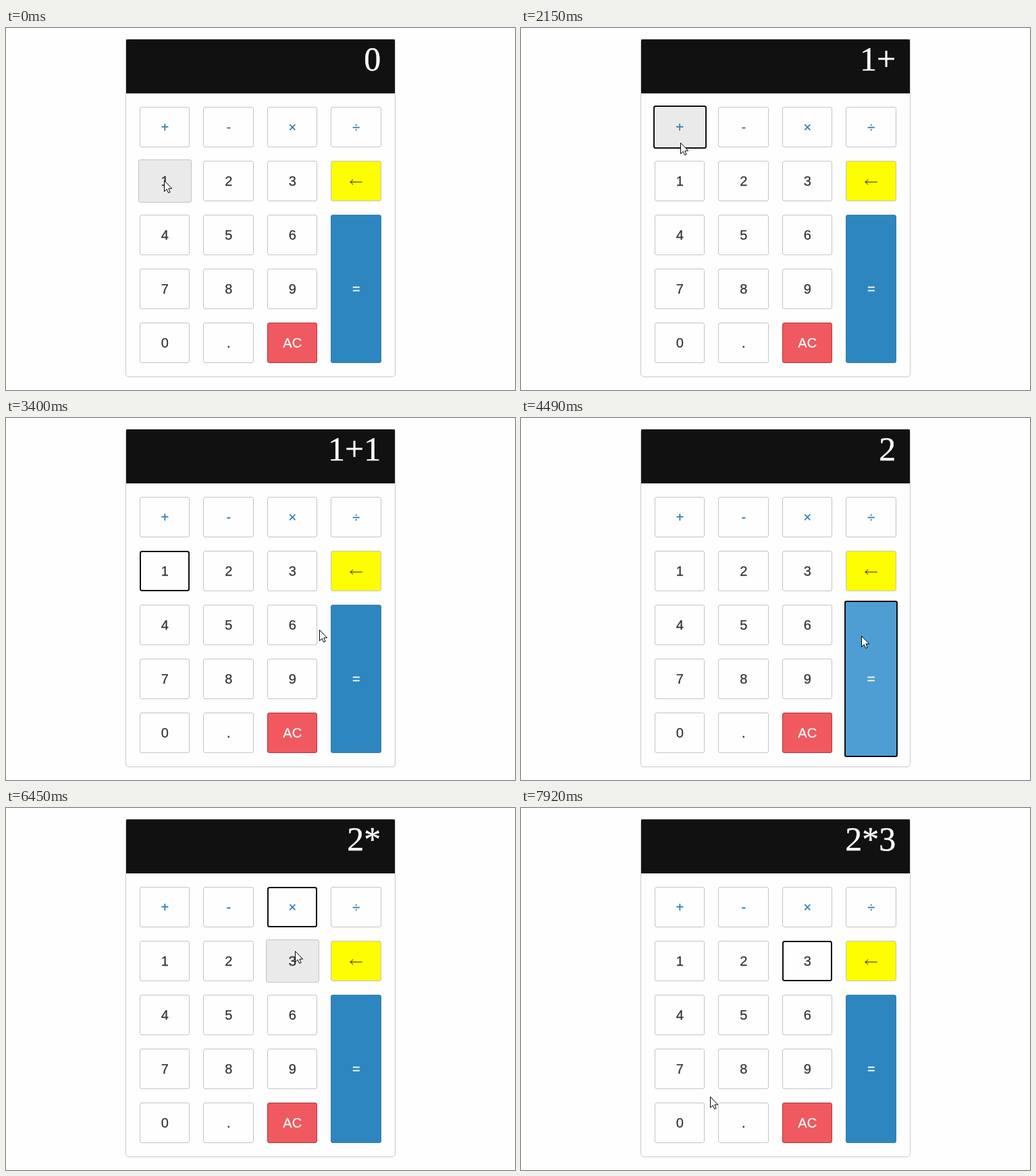
Recreate the animation shown at these times as an HTML page. Size 754 px wide and 537 px high, loop 8 s.

```html
<!DOCTYPE html>
<html lang="en">
<head>
<meta charset="utf-8">
<title>Calculator</title>
<style>
  html, body { margin: 0; width: 100%; height: 100%; overflow: hidden; background: #fefefe; }
  svg { display: block; width: 754px; height: 537px; }
  .label { font: 20px "Liberation Sans", Arial, sans-serif; text-anchor: middle; stroke-width: 0.25; }
  .display {
    font: 50px "Liberation Serif", "Times New Roman", serif;
    text-anchor: end; fill: #fff; stroke: #fff; stroke-width: 0.4;
  }
</style>
</head>
<body>
<svg viewBox="0 0 754 537">
  <rect x="177.5" y="16.5" width="399" height="501" rx="4.5" fill="#fefefe" stroke="#c8c8c8"/>
  <rect x="178" y="17" width="398" height="80" fill="#111"/>
  <text id="display" class="display" x="555.25" y="63">0</text>
  <g id="keys"></g>
  <path id="cursor" d="M0 0V16L3.7 12.6L6.1 18L8.6 17L6.3 11.6H11.2Z" fill="#fff" stroke="#000"/>
</svg>
<script>
const LOOP = 8000;
const TICK = 135; // rough time between pointer steps
const GROW = 1.05;
const NS = "http://www.w3.org/2000/svg";
const ROWS = ["+-×÷", "123←", "456=", "789", "0.A"];

const plain = { fill: "#fefefe", hover: "#eaeaea", border: "#c4c4c4", ink: "#333" };
const operator = { ...plain, ink: "#337cac" };
const STYLES = {
  "+": operator, "-": operator, "×": operator, "÷": operator,
  "←": { ...plain, fill: "#fefe00" },
  "=": { fill: "#2e86c0", hover: "#4e9ed4", border: "#337cac", ink: "#fff" },
  "A": { fill: "#f0595f", hover: "#f17377", border: "#b0353a", ink: "#fff" }
};

// Pointer trips: first step, last step, and where the trip ends.
const HOME = { x: 234.5, y: 226.5 };
const TRIPS = [
  { from: 900, to: 1060, x: 236.5, y: 161.5 },
  { from: 1200, to: 1320, x: 236.5, y: 152.5 },
  { from: 2150, to: 2420, x: 236.5, y: 222.5 },
  { from: 3130, to: 3520, x: 507, y: 331 },
  { from: 4490, to: 5460, x: 444, y: 162 },
  { from: 6300, to: 6700, x: 413.5, y: 262.5 },
  { from: 6840, to: 6970, x: 412.5, y: 242.5 },
  { from: 7660, to: 7920, x: 280.5, y: 428.5 }
];

// Each press focuses a key; its release updates the display.
const PRESSES = [
  { key: "1", down: 500, up: 630, shows: "1" },
  { key: "+", down: 1590, up: 1880, shows: "1+" },
  { key: "1", down: 2730, up: 2860, shows: "1+1" },
  { key: "=", down: 3810, up: 4090, shows: "2" },
  { key: "×", down: 5730, up: 6010, shows: "2*" },
  { key: "3", down: 7250, up: 7390, shows: "2*3" }
];

const byId = id => document.getElementById(id);
const smooth = p => p * p * (3 - 2 * p);

function set(node, attrs) {
  for (const name in attrs) node.setAttribute(name, attrs[name]);
  return node;
}

function add(parent, tag, attrs) {
  return parent.appendChild(set(document.createElementNS(NS, tag), attrs));
}

function makeKey(name, row, col) {
  const x = 198 + 94.5 * col, y = 117 + 80 * row;
  const w = 74.5, h = name === "=" ? 220 : 60;
  const cx = x + w / 2, cy = y + h / 2;
  const style = STYLES[name] || plain;
  const parent = byId("keys");
  const face = add(parent, "rect", { rx: 2.5, stroke: style.border });
  let label;
  if (name === "←") {
    label = add(parent, "path", {
      d: `M${cx - 9} ${cy + 1.5}h18M${cx - 5} ${cy - 2.5}q-1 3-4 4q3 1 4 4`,
      fill: "none", stroke: style.ink
    });
  } else {
    label = add(parent, "text", { class: "label", x: cx, y: cy + 7, fill: style.ink, stroke: style.ink });
    label.textContent = name === "A" ? "AC" : name;
  }
  const ring = add(parent, "rect", { rx: 2.5, fill: "none", stroke: "#101010", "stroke-width": 2 });
  return { name, x, y, w, h, cx, cy, style, face, label, ring };
}

const keys = ROWS.flatMap((line, row) => [...line].map((name, col) => makeKey(name, row, col)));

function pointerAt(time) {
  let { x, y } = HOME;
  for (const trip of TRIPS) {
    if (time < trip.from) break;
    const span = trip.to - trip.from;
    const gaps = Math.round(span / TICK);
    const step = Math.floor((time - trip.from) / span * gaps + 0.01) + 1;
    const p = smooth(Math.min(1, step / (gaps + 1)));
    x += (trip.x - x) * p;
    y += (trip.y - y) * p;
  }
  return { x: Math.floor(x) + 0.5, y: Math.floor(y) + 0.5 };
}

function drawKey(key, hover, focused) {
  const { cx, cy, w, h, style } = key;
  const scale = hover ? GROW : 1;
  const snapEnd = hover ? Math.ceil : Math.floor;
  const left = Math.floor(cx - w * scale / 2), right = snapEnd(cx + w * scale / 2);
  const top = Math.floor(cy - h * scale / 2), bottom = snapEnd(cy + h * scale / 2);
  const inset = d => ({ x: left + d, y: top + d, width: right - left - 2 * d, height: bottom - top - 2 * d });
  set(key.face, { ...inset(0.5), fill: hover ? style.hover : style.fill });
  set(key.ring, { ...inset(1), visibility: focused ? "visible" : "hidden" });
  if (hover) {
    set(key.label, { transform: `translate(${cx} ${cy}) scale(${scale}) translate(${-cx} ${-cy})` });
  } else {
    key.label.removeAttribute("transform");
  }
}

function render(time) {
  const { x, y } = pointerAt(time);
  const pressed = PRESSES.filter(p => p.down <= time).pop();
  const released = PRESSES.filter(p => p.up <= time).pop();
  byId("display").textContent = released ? released.shows : "0";
  set(byId("cursor"), { transform: `translate(${x} ${y})` });
  for (const key of keys) {
    const hover = x >= key.x && x < key.x + key.w && y >= key.y && y < key.y + key.h;
    drawKey(key, hover, Boolean(pressed) && pressed.key === key.name);
  }
}

const start = performance.now();
function tick() {
  render((performance.now() - start) % LOOP);
  requestAnimationFrame(tick);
}
tick();
</script>
</body>
</html>
```
